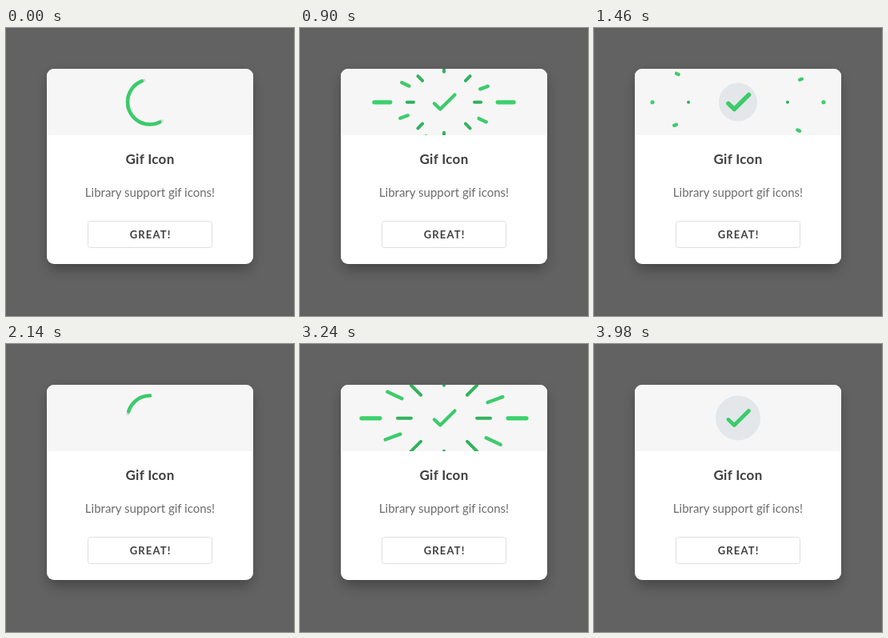
An HTML page for the animation above (4 s loop, 360 by 360 pixels).

```html
<!DOCTYPE html>
<html lang="en">
<head>
<meta charset="utf-8">
<title>Success dialog</title>
<style>
  html, body { margin: 0; width: 100%; height: 100%; overflow: hidden; background: #626262; }
  svg { display: block; width: 100vw; height: 100vh; }
  text { font-family: Lato, "Open Sans", sans-serif; text-anchor: middle; }
  .stroke { fill: none; stroke-linecap: round; stroke-linejoin: round; }
</style>
</head>
<body>
<svg viewBox="0 0 360 360">
  <defs>
    <clipPath id="card"><rect x="51" y="51" width="258" height="244" rx="9"/></clipPath>
    <clipPath id="header"><rect x="51" y="51" width="258" height="83"/></clipPath>
    <filter id="blur" x="-20%" y="-20%" width="140%" height="140%"><feGaussianBlur stdDeviation="8"/></filter>
  </defs>
  <rect width="360" height="360" fill="#626262"/>
  <rect x="53" y="59" width="254" height="243" rx="9" fill="#000" opacity=".3" filter="url(#blur)"/>
  <g clip-path="url(#card)">
    <rect x="51" y="51" width="258" height="244" fill="#fff"/>
    <rect x="51" y="51" width="258" height="83" fill="#f6f6f6"/>
    <g clip-path="url(#header)">
      <g id="rays"></g>
      <circle id="disc" cx="180" cy="92.5" fill="#e3e7e9"/>
      <path id="ghost" class="stroke" stroke="#9aa8a0" stroke-width="4" opacity=".4"/>
      <path id="tick" class="stroke" stroke="#3bcb6b"/>
    </g>
  </g>
  <text x="180" y="169.5" font-size="17" font-weight="700" letter-spacing=".3" fill="#404040">Gif Icon</text>
  <text x="180" y="210.5" font-size="15" fill="#6c6c6c">Library support gif icons!</text>
  <rect x="102.5" y="241.5" width="155" height="33" rx="3" fill="#fff" stroke="#dedede"/>
  <text x="180.7" y="262.7" font-size="13" font-weight="700" letter-spacing="1.2" fill="#404040">GREAT!</text>
</svg>
<script>
const LOOP = 4000, CYCLE = 2260, LEAD = 190;
const $ = id => document.getElementById(id);
const set = (el, attrs) => { for (const k in attrs) el.setAttribute(k, attrs[k]); };

// Linear interpolation through [time, value] stops.
function track(t, stops) {
  if (t <= stops[0][0]) return stops[0][1];
  for (let i = 1; i < stops.length; i++) {
    const [t0, v0] = stops[i - 1], [t1, v1] = stops[i];
    if (t <= t1) return v0 + (v1 - v0) * (t - t0) / (t1 - t0);
  }
  return stops[stops.length - 1][1];
}

// The spinner runs counter-clockwise and flows into the check mark.
const spin = "M180 64.5A28 28 0 0 0 180 120.5A28 28 0 0 0 180 64.5A28 28 0 0 0 160.2 72.7";
const entry = "C157 76 161 87 167.5 94", check = "L175.3 101.5L193.5 83.5";
const tick = $("tick"), ghost = $("ghost");
const measure = d => { tick.setAttribute("d", d); return tick.getTotalLength(); };
const checkStart = measure(spin + entry), pathEnd = measure(spin + entry + check);
ghost.setAttribute("d", spin + entry + check);

const headStops = [[0, 0], [70, 35], [190, 100], [610, pathEnd - 9], [690, pathEnd]];
const tailStops = [[0, 0], [70, 0], [190, 10], [610, checkStart - 9], [690, checkStart]];

const kinds = {
  long: {
    color: "#3bd16b", width: 5.2, angles: [0, 180],
    head: [[980, 36], [1090, 87], [1170, 103], [1300, 107]],
    tail: [[980, 36], [1090, 67], [1170, 80], [1500, 106.9]]
  },
  mid: {
    color: "#3fcb6d", width: 4.4, angles: [25, 160, 205, 340, 118, 258],
    head: [[980, 30], [1090, 58], [1170, 78], [1350, 85]],
    tail: [[980, 30], [1090, 48], [1170, 58], [1650, 82]]
  },
  short: {
    color: "#32b25e", width: 4, angles: [0, 45, 90, 135, 180, 225, 270, 315],
    head: [[980, 28], [1090, 46], [1170, 58], [1350, 62]],
    tail: [[980, 28], [1090, 38], [1170, 41], [1550, 61.9]]
  }
};

const rays = Object.values(kinds).flatMap(kind => kind.angles.map(angle => {
  const el = document.createElementNS("http://www.w3.org/2000/svg", "line");
  set(el, { class: "stroke", stroke: kind.color, transform: `translate(180 92.8) rotate(${angle})` });
  $("rays").append(el);
  return { el, kind };
}));

function dash(el, from, to) {
  set(el, { "stroke-dasharray": `${Math.max(0.01, to - from)} 9999`, "stroke-dashoffset": -from });
}

function render(time) {
  const t = (time % LOOP + LEAD) % CYCLE;
  const head = track(t, headStops), tail = track(t, tailStops);
  dash(tick, tail, head);
  tick.setAttribute("stroke-width", track(t, [[610, 4.6], [900, 4.2], [1520, 4.2], [1650, 5.5], [1730, 4.7]]));
  dash(ghost, Math.max(0, tail - 3), head + 3);
  ghost.style.display = t < 500 ? "" : "none";

  const shrink = track(t, [[1650, 1], [1730, 0]]);
  $("rays").style.display = t > 980 && t < 1730 ? "" : "none";
  for (const { el, kind } of rays)
    set(el, { x1: track(t, kind.tail), x2: track(t, kind.head), "stroke-width": kind.width * shrink });

  $("disc").setAttribute("r", track(t, [[1520, 0], [1650, 24], [1725, 28]]));
}

const start = performance.now();
function tickFrame() {
  render(performance.now() - start);
  requestAnimationFrame(tickFrame);
}
tickFrame();
</script>
</body>
</html>
```
